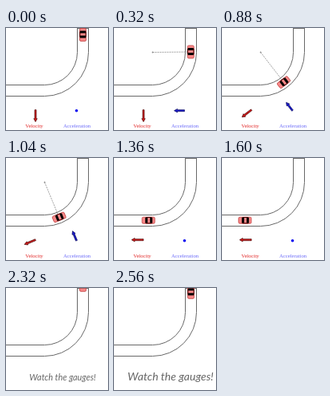
Animation, 128 px wide and 128 px high, one loop 2640 ms. Source, as an HTML page with a canvas:

```html
<!DOCTYPE html>
<html lang="en">
<head>
<meta charset="utf-8">
<title>Car on a bend</title>
<style>
  html, body { margin: 0; width: 100%; height: 100%; overflow: hidden; background: #fff; }
  canvas { display: block; width: 100vw; height: 100vh; }
</style>
</head>
<body>
<canvas id="stage" width="128" height="128"></canvas>
<script>
const ctx = document.getElementById('stage').getContext('2d');
const STEP = 80, STEPS = 33;
const BEND = { x: 48, y: 30, r: 48, from: 4, to: 16 };
const RESTART = 28;

// Car centre and heading for a step; heading 0 points down.
function carAt(k) {
  if (k >= RESTART) return { x: 96.5, y: -6.7 + 3 * (k - RESTART), a: 0 };
  if (k < BEND.from) return { x: 96.5, y: 8.5 + 5.3 * k, a: 0 };
  if (k > BEND.to) return { x: BEND.x - 4.8 * (k - BEND.to), y: 78.2, a: Math.PI / 2 };
  const a = (k - BEND.from) / (BEND.to - BEND.from) * Math.PI / 2;
  return { x: BEND.x + .3 + BEND.r * Math.cos(a), y: BEND.y + BEND.r * Math.sin(a), a };
}

function at(x, y, angle, draw) {
  ctx.save();
  ctx.translate(x, y);
  ctx.rotate(angle);
  draw();
  ctx.restore();
}

function box(color, x, y, w, h) {
  ctx.fillStyle = color;
  ctx.fillRect(x, y, w, h);
}

function disc(color, x, y, r) {
  ctx.fillStyle = color;
  ctx.beginPath();
  ctx.arc(x, y, r, 0, 2 * Math.PI);
  ctx.fill();
}

function label(text, x, y, font, color, align = 'left') {
  ctx.font = font;
  ctx.textAlign = align;
  ctx.fillStyle = color;
  ctx.fillText(text, x, y);
}

function road() {
  ctx.strokeStyle = '#686868';
  ctx.lineWidth = 1;
  for (const r of [41, 55]) {
    ctx.beginPath();
    ctx.moveTo(BEND.x + r + .5, 0);
    ctx.arc(BEND.x + .5, BEND.y + .5, r, 0, Math.PI / 2);
    ctx.lineTo(0, BEND.y + r + .5);
    ctx.stroke();
  }
  box('#686868', BEND.x + 41, 0, 15, 1);
}

function car({ x, y, a }) {
  at(x, y, a, () => {
    ctx.beginPath();
    ctx.roundRect(-4, -8, 8, 16, 1.5);
    ctx.fillStyle = '#f88888';
    ctx.fill();
    ctx.strokeStyle = '#c04040';
    ctx.lineWidth = .8;
    ctx.stroke();
    box('#000', -3.5, -5, 7, 3);
    box('#000', -3.5, 1, 7, 3);
    box('#400', -4.2, -4, 1, 7);
    box('#400', 3.2, -4, 1, 7);
  });
}

// Arrow from its tail, pointing down when angle is 0.
function arrow(x, y, angle, length, fill, edge) {
  at(x, y, angle, () => {
    const neck = length - 4;
    ctx.beginPath();
    ctx.moveTo(-1, 0);
    ctx.lineTo(-1, neck);
    ctx.lineTo(-2.2, neck);
    ctx.lineTo(0, length);
    ctx.lineTo(2.2, neck);
    ctx.lineTo(1, neck);
    ctx.lineTo(1, 0);
    ctx.closePath();
    ctx.fillStyle = fill;
    ctx.fill();
    ctx.strokeStyle = edge;
    ctx.lineWidth = .7;
    ctx.stroke();
  });
}

function radius({ x, y }) {
  ctx.strokeStyle = '#888';
  ctx.lineWidth = .8;
  ctx.setLineDash([2, 1]);
  ctx.beginPath();
  ctx.moveTo(BEND.x + .5, BEND.y + .5);
  ctx.lineTo(x, y);
  ctx.stroke();
  ctx.setLineDash([]);
  disc('#888', BEND.x + .5, BEND.y + .5, .9);
}

function gauges(angle, turning) {
  const font = '6.7px "Liberation Serif", serif';
  arrow(37, 102.7, angle, 15, '#d01818', '#501010');
  if (turning) arrow(88.5, 103.7, angle + Math.PI / 2, 13, '#1818d0', '#101060');
  else disc('#0000f0', 88.5, 103.7, 1.8);
  label('Velocity', 24.3, 125, font, '#e02020');
  label('Acceleration', 72, 125, font, '#6868f8');
}

function message(n) {
  const size = 9.8 + 1.06 * n;
  label('Watch the gauges!', 71, 115.5, `italic ${size}px Lato, sans-serif`, '#666', 'center');
}

function render(k) {
  const pose = carAt(k);
  const turning = k >= BEND.from && k < BEND.to;
  box('#fff', 0, 0, 128, 128);
  road();
  if (turning) radius(pose);
  car(pose);
  if (k < RESTART) gauges(pose.a, turning);
  else message(k - RESTART);
}

const start = performance.now();
function tick() {
  render(Math.floor((performance.now() - start) / STEP) % STEPS);
  requestAnimationFrame(tick);
}
tick();
</script>
</body>
</html>
```
